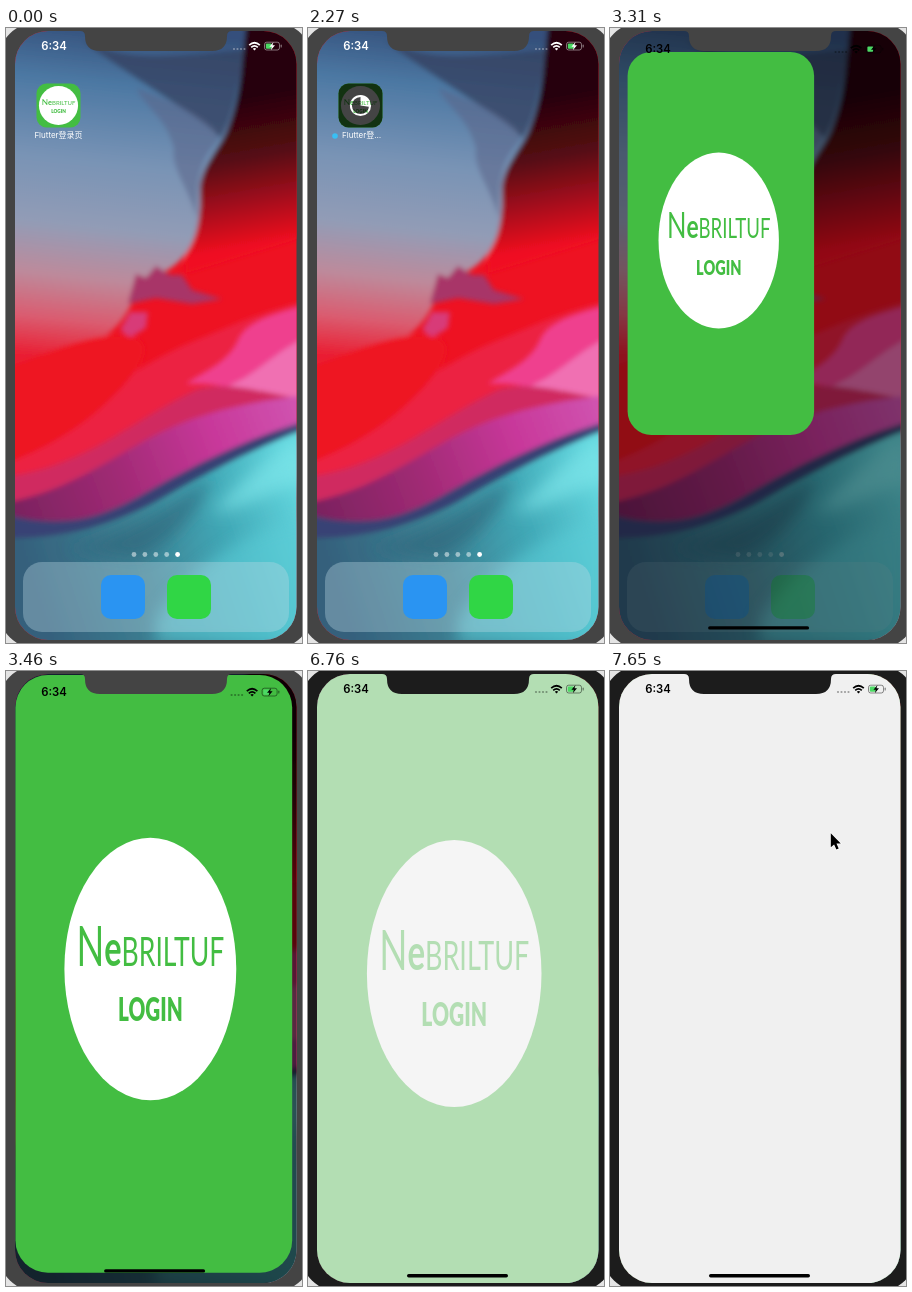
An HTML page for the animation above (8 s loop, 296 by 615 pixels).

```html
<!DOCTYPE html>
<html lang="zh">
<head>
<meta charset="utf-8">
<title>App launch</title>
<style>
  html, body { margin: 0; width: 100%; height: 100%; overflow: hidden; background: #e4e4e4; }
  svg { display: block; width: 296px; height: 615px; }
  text { font-family: Inter, "Noto Sans CJK SC", "Noto Sans CJK", sans-serif; }
  .logo text { font-family: Lato, sans-serif; fill: #43bd42; text-anchor: middle; }
  .label { font-size: 8px; fill: #fff; }
</style>
</head>
<body>
<svg viewBox="0 0 296 615">
  <defs>
    <clipPath id="screen"><rect x="9" y="3" width="281.5" height="609" rx="33"/></clipPath>
    <filter id="soft" x="-10%" y="-10%" width="120%" height="120%"><feGaussianBlur stdDeviation="2.5"/></filter>
    <filter id="softer" x="-50%" y="-50%" width="200%" height="200%"><feGaussianBlur stdDeviation="8"/></filter>
    <linearGradient id="sky" gradientUnits="userSpaceOnUse" x1="120" y1="0" x2="85" y2="335">
      <stop offset="0" stop-color="#34507b"/>
      <stop offset=".17" stop-color="#4c78a3"/>
      <stop offset=".4" stop-color="#7893b5"/>
      <stop offset=".6" stop-color="#929cb6"/>
      <stop offset=".75" stop-color="#bd8a9b"/>
      <stop offset=".88" stop-color="#da5c70"/>
      <stop offset="1" stop-color="#ea1c30"/>
    </linearGradient>
    <linearGradient id="night" gradientUnits="userSpaceOnUse" x1="240" y1="70" x2="266" y2="215">
      <stop offset="0" stop-color="#280407"/>
      <stop offset=".4" stop-color="#560913"/>
      <stop offset=".7" stop-color="#a20d1c"/>
      <stop offset="1" stop-color="#f01020"/>
    </linearGradient>
    <linearGradient id="violet" gradientUnits="userSpaceOnUse" x1="10" y1="480" x2="290" y2="370">
      <stop offset="0" stop-color="#7c2360"/>
      <stop offset=".35" stop-color="#a02a74"/>
      <stop offset=".7" stop-color="#c8389a"/>
      <stop offset="1" stop-color="#d054b0"/>
    </linearGradient>
    <linearGradient id="sea" gradientUnits="userSpaceOnUse" x1="20" y1="540" x2="290" y2="450">
      <stop offset="0" stop-color="#35607c"/>
      <stop offset=".4" stop-color="#3c8294"/>
      <stop offset=".72" stop-color="#42aab8"/>
      <stop offset="1" stop-color="#62d6de"/>
    </linearGradient>
    <mask id="progress" maskUnits="userSpaceOnUse" x="30" y="55" width="46" height="46">
      <rect x="30" y="55" width="46" height="46" fill="#fff"/>
      <g fill="none" stroke="#000">
        <circle cx="52.5" cy="77.5" r="9.6" stroke-width="2"/>
        <circle id="pie" cx="52.5" cy="77.5" r="5" stroke-width="10" pathLength="360" transform="rotate(-90 52.5 77.5)"/>
      </g>
    </mask>
    <g id="logo" class="logo">
      <circle r="87.3" fill="#fff"/>
      <text y="-2" font-size="27"><tspan font-size="37">N</tspan><tspan font-size="33" font-weight="700">e</tspan>BRILTUF</text>
      <text y="34.5" font-size="21" font-weight="900">LOGIN</text>
    </g>
  </defs>

  <rect id="bezel" x="-8" y="-6" width="315" height="627" rx="40"/>

  <g clip-path="url(#screen)">
    <g id="home">
      <rect width="296" height="615" fill="#ee1222"/>
      <g filter="url(#soft)">
        <path fill="url(#night)" d="M170 -9H310V205L180 245Z"/>
        <path fill="url(#sky)" d="M-9 -9H241C236 30 236 65 222 100C215 120 193 140 194 165C196 210 180 238 148 248C128 255 130 285 100 308C70 322 30 325 -9 345Z"/>
        <path fill="#34405f" opacity=".75" d="M75 12C120 32 150 30 238 22C232 60 226 95 214 110C200 92 150 66 75 12Z"/>
        <path fill="#5c6589" opacity=".55" d="M130 60C170 75 215 95 212 112C195 130 190 150 191 190C180 155 165 140 168 120C160 90 140 80 130 60Z"/>
        <path fill="#a83568" d="M122 276L130 246L140 250L150 238L164 247L176 247L186 262L216 271L186 276L150 270Z"/>
        <path fill="#d83a78" d="M114 302L124 284L142 284L140 300L124 310Z"/>
        <path fill="#ec2f5c" d="M-9 410C60 400 120 340 190 312C230 296 250 285 310 270V400L-9 470Z" opacity=".55"/>
        <path fill="#ee1222" d="M-9 345C50 320 100 300 130 310C150 320 130 350 90 385C60 410 30 425 -9 440Z"/>
        <path fill="#ef3f8e" d="M310 274C270 285 240 292 232 312C222 335 195 345 180 356C220 352 260 375 310 370Z"/>
        <path fill="#f070b2" d="M310 305C270 320 255 345 222 358C255 362 280 385 310 375Z"/>
        <path fill="#d02a60" d="M-9 450C80 440 120 395 190 362C225 350 270 370 310 372V410L-9 490Z"/>
        <path fill="url(#violet)" d="M-9 476C50 468 90 440 140 412C190 384 250 372 310 366V420L60 520L-9 510Z"/>
        <path fill="#384274" d="M-9 484C50 502 90 492 130 470C190 436 240 410 310 390V630H-9Z"/>
        <path fill="url(#sea)" d="M-9 510C50 512 100 500 150 474C200 446 250 418 310 398V630H-9Z"/>
      </g>
      <g filter="url(#softer)">
        <path fill="#7ce4e8" opacity=".7" d="M300 405C265 425 240 450 205 485C240 480 270 460 300 455Z"/>
        <path fill="#2c6478" opacity=".6" d="M60 520C110 515 160 480 205 450C190 490 160 520 130 530Z"/>
        <path fill="#5aced8" opacity=".6" d="M150 590C190 530 250 500 300 490V615H150Z"/>
      </g>
      <g id="homeItems">
        <g id="pageDots" fill="#fff"></g>
        <rect x="17" y="534" width="266" height="70" rx="19" fill="#bcd8e4" opacity=".36"/>
        <rect x="95" y="547" width="44" height="44" rx="10" fill="#2a94f2"/>
        <rect x="161" y="547" width="44" height="44" rx="10" fill="#30d645"/>
        <text id="fullLabel" class="label" x="52.5" y="110" text-anchor="middle">Flutter登录页</text>
        <g id="newLabel">
          <circle id="newDot" cx="27" cy="108" r="2.8" fill="#38bff4"/>
          <text class="label" x="34" y="110">Flutter登…</text>
        </g>
      </g>
      <rect id="shade" width="296" height="615"/>
    </g>

    <rect id="card" fill="#43bd42"/>
    <use id="cardLogo" href="#logo"/>
    <rect id="dim" x="30.5" y="55.5" width="44" height="44" rx="10" mask="url(#progress)"/>
    <rect id="veil" width="296" height="615" fill="#f0f0f0"/>
    <rect id="homeBar" x="99" y="603" width="101" height="3.4" rx="1.7"/>

    <g id="status" fill="currentColor">
      <text id="clock" x="35.3" y="22" font-size="11.3" font-weight="600">6:34</text>
      <g id="signals">
        <g opacity=".35">
          <circle cx="228" cy="21" r="1.1"/><circle cx="231.5" cy="21" r="1.1"/>
          <circle cx="235" cy="21" r="1.1"/><circle cx="238.5" cy="21" r="1.1"/>
        </g>
        <g fill="none" stroke="currentColor" stroke-width="1.7">
          <path d="M243.2 17.2Q248.5 12.3 253.8 17.2M245.2 19.3Q248.5 16.3 251.8 19.3"/>
        </g>
        <path d="M248.5 22.6L246.8 20.7Q248.5 19.4 250.2 20.7Z"/>
        <rect x="258.5" y="14.2" width="15" height="7.8" rx="2.2" fill="none" stroke="currentColor" opacity=".45"/>
        <rect x="259.8" y="15.5" width="6" height="5.2" rx="1" fill="#4cd964"/>
        <path d="M267.5 14L263.4 18.8H265.8L264.8 22.2L269 17.3H266.5Z"/>
        <rect x="274.6" y="16.6" width="1.2" height="3" rx=".6" opacity=".45"/>
      </g>
    </g>
    <path id="pointer" d="M0 0V14L3.3 11.2L5.6 16.4L7.9 15.4L5.7 10.3H10Z" stroke="#fff" stroke-width="1.2" paint-order="stroke"/>
  </g>
  <path id="notch" d="M74 0V3Q79 3 79 8Q79 23 94 23H206Q221 23 221 8Q221 3 226 3V0Z"/>
</svg>
<script>
const LOOP = 8000, STEP = 147.5;
const GROWTH = [.025, .6, .98, .997, 1];
const $ = id => document.getElementById(id);
const set = (id, attrs) => { for (const k in attrs) $(id).setAttribute(k, attrs[k]); };
const show = (id, on) => set(id, { opacity: +on });
const lerp = (a, b, p) => a + (b - a) * p;
const clamp = v => Math.max(0, Math.min(1, v));

$('pageDots').innerHTML = [0, 1, 2, 3, 4].map(i =>
  `<circle cx="${128 + i * 10.9}" cy="526.5" r="2.4" opacity="${i < 4 ? .5 : 1}"/>`).join('');

function draw(t) {
  const step = Math.floor((t - 500) / STEP);
  const installing = step >= 0 && step < 18;
  const launched = step >= 18;
  const p = launched ? GROWTH[Math.min(step - 18, 4)] : 0;
  const inApp = p > .5;

  // Installation: icon dims, then a wedge fills half of the ring.
  show('fullLabel', step < 0);
  set('newLabel', { opacity: installing ? 1 : p && !inApp ? .8 : 0 });
  show('newDot', installing);
  set('dim', { opacity: installing ? .73 * clamp((step + 1) / 4) : 0 });
  set('pie', { 'stroke-dasharray': `${20 * Math.max(0, Math.min(9, step - 7))} 400` });

  // Launch: the icon stretches to fill the screen.
  const x = lerp(30.5, 9, p), y = lerp(55.5, 3, p);
  set('card', {
    x, y, width: lerp(74.5, 290.5, p) - x, height: lerp(99.5, 612, p) - y, rx: lerp(10, 33, p)
  });
  set('cardLogo', {
    transform: `translate(${lerp(52.5, 146.2, p)} ${lerp(77.5, 302.5, p)})
      scale(${lerp(.224, 1, p)} ${lerp(.224, 1.53, p)})`
  });
  set('homeItems', { opacity: launched && inApp ? 1 - p : 1 });
  set('shade', { opacity: inApp ? .65 * p : 0 });

  const lag = inApp ? Math.min(3, (1 - p) * 150) : 0;
  set('status', { color: inApp ? '#000' : '#fff' });
  set('clock', { transform: `translate(0 ${lag})` });
  set('signals', { transform: `translate(${-lag * .8} ${lag})` });
  set('homeBar', { opacity: +inApp, transform: `translate(${-lag * .3} ${-lag * 1.6})` });

  const body = t < 4510 ? '#444' : '#1c1c1c';
  set('bezel', { fill: body });
  set('notch', { fill: body });

  set('veil', { opacity: t < 6760 ? 0 : t < 6900 ? .65 : 1 });
  show('pointer', t >= 7500);
  set('pointer', { transform: t < 7650 ? 'translate(266 165)' : 'translate(220.8 162.2)' });
}

const start = performance.now();
function tick() {
  draw((performance.now() - start) % LOOP);
  requestAnimationFrame(tick);
}
tick();
</script>
</body>
</html>
```
